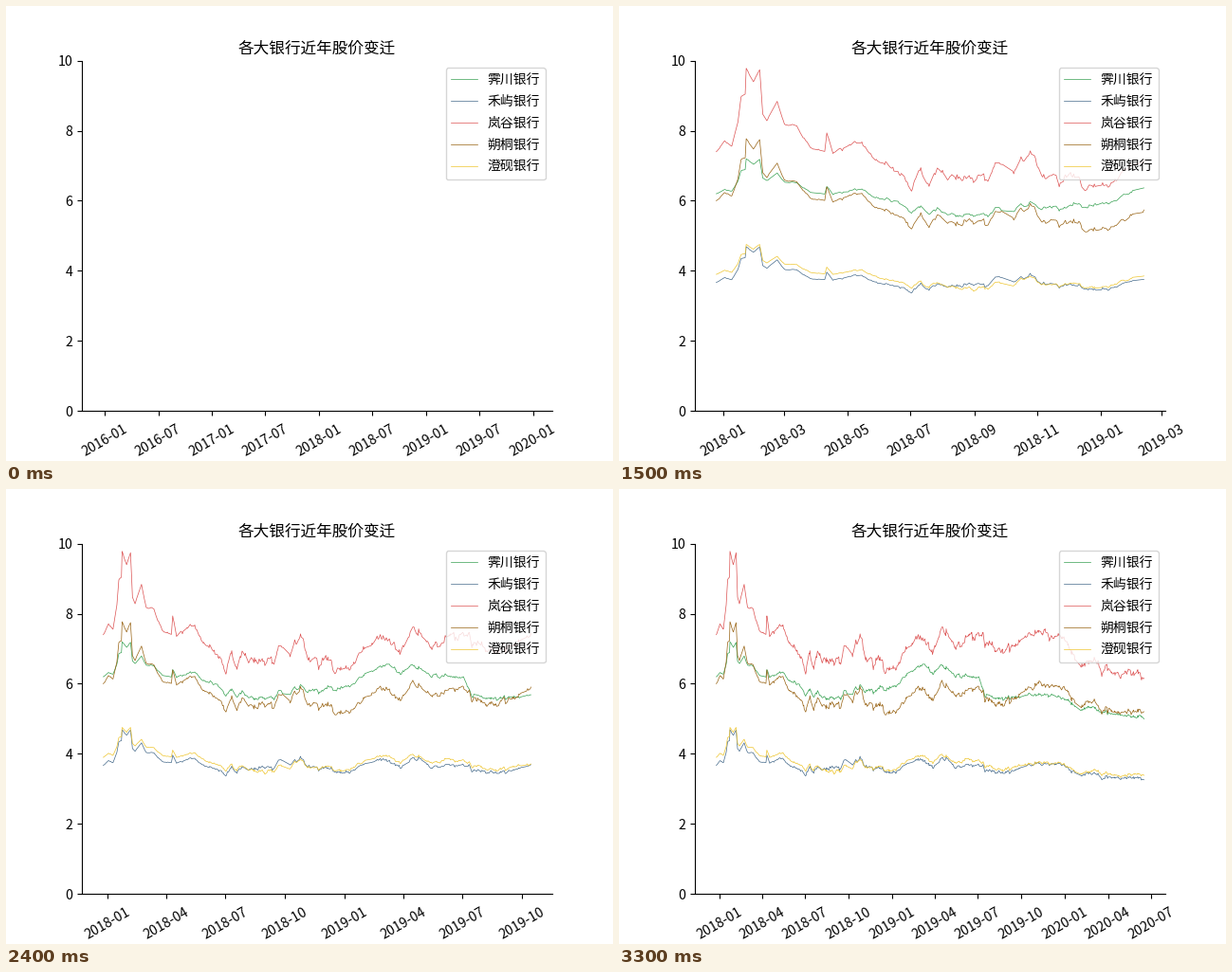
A matplotlib script for the animation above (3600 ms loop, 640x480 px).

```python
import numpy as np
import matplotlib.pyplot as plt
import matplotlib.dates as mdates
from matplotlib.animation import FuncAnimation
from matplotlib.lines import Line2D
from matplotlib.patches import FancyBboxPatch
from matplotlib.transforms import Affine2D

W, H = 640, 480
FRAMES, INTERVAL = 12, 300
LAST = 600  # index of the final trading day

plt.rcParams["font.family"] = "Noto Sans CJK JP"
plt.rcParams["font.size"] = 10

# Exchange holidays: first day and number of weekdays closed
CLOSED = {
    "2018-01-01": 1, "2018-02-15": 5, "2018-04-05": 2, "2018-04-30": 2,
    "2018-06-18": 1, "2018-09-24": 1, "2018-10-01": 5, "2018-12-31": 2,
    "2019-02-04": 5, "2019-04-05": 1, "2019-05-01": 3, "2019-06-07": 1,
    "2019-09-13": 1, "2019-10-01": 5, "2020-01-01": 1, "2020-01-24": 6,
    "2020-04-06": 1, "2020-05-01": 3,
}

# Turning points of the whole sector: days since the start, change in percent
MARKET = [
    (0, 0), (8, 5), (15, 2), (21, 11), (24, 21), (28, 22), (29, 32), (36, 27),
    (42, 32), (45, 15), (49, 12), (59, 19), (66, 11), (78, 10), (91, 1),
    (105, 0), (107, 7), (113, -1), (141, 4), (152, -2), (180, -8), (189, -15),
    (198, -6), (206, -13), (215, -6), (232, -11), (262, -10), (271, -3),
    (290, -8), (304, -2), (320, -10), (350, -9), (359, -15), (381, -13),
    (401, -5), (430, -1), (457, -6), (477, 5), (508, -5), (543, 0), (564, 1),
    (568, -5), (614, -6), (682, 1), (736, -2), (771, -12), (798, -9),
    (814, -15), (904, -14),
]

# Each bank: name, colour, sensitivity to the sector, own slow drift
DRIFT_DAYS = [0, 170, 250, 330, 435, 556, 566, 700, 904]
BANKS = [
    ("霁川银行", "#35a050", 0.50, [6.2, 6.2, 5.83, 6.12, 6.6, 6.17, 5.8, 5.67, 5.54]),
    ("禾屿银行", "#44698a", 0.85, [3.67, 3.78, 3.92, 3.92, 3.88, 3.65, 3.62, 3.7, 3.8]),
    ("岚谷银行", "#dc5050", 1.00, [7.4] * 9),
    ("朔桐银行", "#96600f", 0.92, [6, 6, 5.92, 5.91, 5.92, 5.86, 5.72, 5.93, 6.05]),
    ("澄砚银行", "#eec52e", 0.68, [3.9, 3.92, 3.75, 3.87, 3.96, 3.8, 3.72, 3.72, 3.83]),
]


def trading_days():
    closed = [np.busday_offset(day, i) for day, n in CLOSED.items() for i in range(n)]
    return np.busday_offset("2017-12-25", np.arange(LAST + 1), holidays=closed)


def wander(rng, size, pull=0.25):
    """Random walk that is pulled back to zero."""
    out = np.zeros(LAST + 1)
    for i, step in enumerate(rng.normal(0, size, LAST), 1):
        out[i] = out[i - 1] * (1 - pull) + step
    return out


dates = mdates.date2num(trading_days())
age = dates - dates[0]
rng = np.random.default_rng(8)
calm = np.interp(age, [100, 200], [0.25, 1])  # the early moves are smoother
sector = np.interp(age, *zip(*MARKET)) / 100 + calm * wander(rng, 0.007)


def prices(beta, drift):
    base = np.interp(age, DRIFT_DAYS, drift)
    return base + drift[0] * (beta * sector + calm * wander(rng, 0.003))


fig = plt.figure(figsize=(W / 100, H / 100), dpi=100)
ax = fig.add_axes([0.125, 0.11, 0.775, 0.77])
ax.set_title("各大银行近年股价变迁", fontsize=12)
ax.spines[["top", "right"]].set_visible(False)
ax.set_ylim(0, 10)
ax.xaxis_date()
ax.tick_params(labelsize=10.2)
ax.tick_params(axis="x", rotation=30, pad=5)

# Pixel coordinates measured from the top left corner
px = Affine2D().scale(1 / W, -1 / H).translate(0, 1) + fig.transFigure

fig.add_artist(FancyBboxPatch(
    (463.5, 65), 105.5, 118.4, boxstyle="round,pad=0,rounding_size=2.78",
    fc="white", ec="0.8", lw=1, alpha=0.8, snap=True, transform=px, zorder=5))

series, lines = [], []
for i, (name, color, beta, drift) in enumerate(BANKS):
    y = 77 + 23 * i
    series.append(prices(beta, drift))
    lines += ax.plot([], [], color=color, lw=0.5)
    fig.add_artist(Line2D([469.2, 497], [y, y], color=color, lw=0.5,
                          transform=px, zorder=6))
    fig.text(507.9, y + 5, name, transform=px, va="baseline", zorder=6)


def draw(k):
    n = LAST * k // (FRAMES - 1) + 1
    for line, data in zip(lines, series):
        line.set_data(dates[:n], data[:n])
    lo, hi = dates[0], dates[n - 1]
    if n == 1:  # a lone day sits in a four-year window
        lo, hi = lo - 730, hi + 730
    pad = 0.05 * (hi - lo)
    ax.set_xlim(lo - pad, hi + pad)
    return lines


anim = FuncAnimation(fig, draw, frames=FRAMES, init_func=lambda: draw(0),
                     interval=INTERVAL, repeat=True, repeat_delay=0, blit=False)
plt.show()
```
